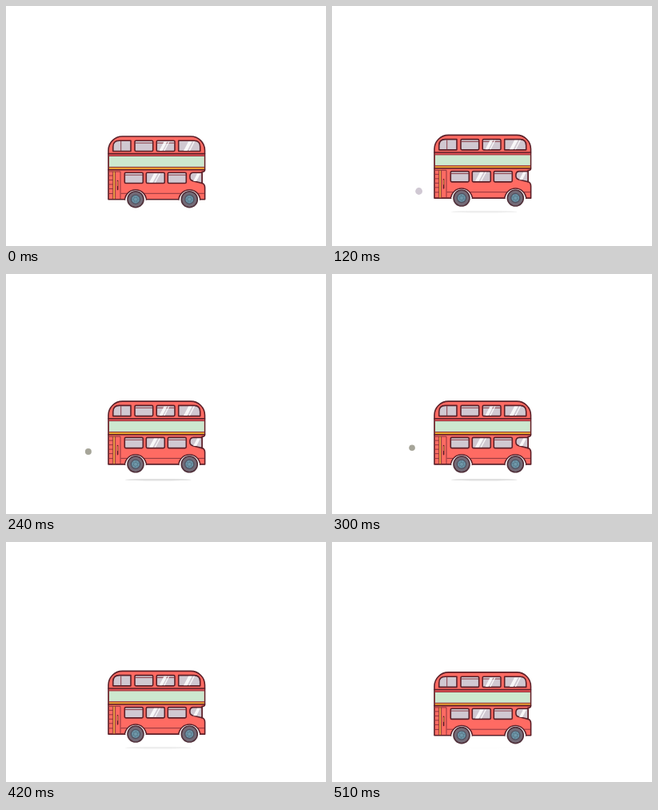
These frames come from a looping animation (400 by 300 pixels, 540 ms). An HTML page:

```html
<!DOCTYPE html>
<html lang="en">
<head>
<meta charset="utf-8">
<title>Bouncing bus</title>
<style>
  html, body { margin: 0; width: 100%; height: 100%; overflow: hidden; background: #fff; }
  svg { display: block; width: 400px; height: 300px; }
  .ink { stroke: #5c2029; stroke-width: 1.6; stroke-linejoin: round; stroke-linecap: round; }
  .thin { stroke: #83303a; stroke-width: .9; fill: none; }
  .red { fill: #ff6b63; }
  .glass { fill: #d0c8d1; }
  .glare { fill: #fff; opacity: .85; }
</style>
</head>
<body>
<svg viewBox="0 0 400 300">
  <defs>
    <g id="wheel">
      <circle r="10" fill="#746b77" stroke="#50303a" stroke-width="1.6"/>
      <circle r="5.6" fill="#6a93a6" stroke="#50505f" stroke-width="1.2"/>
      <g class="spokes" stroke="#54707f" stroke-width=".6" fill="none">
        <path d="M-4.5 0H4.5M-2.3-3.9L2.3 3.9M2.3-3.9L-2.3 3.9"/>
        <circle r="2.4" fill="#7199ab"/>
      </g>
    </g>
  </defs>
  <ellipse id="shadow" cx="190.2" cy="257.2" rx="41.5" ry="1.3" fill="#e0e0e0"/>
  <circle id="puff"/>
  <g id="bus">
    <path class="ink red" d="M128 241.8V180.5A17.5 17.5 0 0 1 145.5 163H231A17.5 17.5 0 0 1 248.5 180.5V205Q248.5 207.3 245 207.3V221.5Q248.6 222.5 248.6 227V241.8Z"/>
    <path fill="#e95156" d="M129 185H247.7V187.5H129Z"/>
    <path fill="#cce8cf" d="M129 188H247.7V201H129Z"/>
    <path d="M129 202.8H247.7" stroke="#e9a72c" stroke-width="2"/>
    <path class="ink" fill="none" d="M128 184.6H248.5M128 204.7H248.5"/>
    <path class="thin" d="M128 187.5H248.5M128 201.4H248.5"/>
    <g id="windows"></g>
    <path class="thin" d="M143.7 169V181M161.5 171.2H183M188.5 171.2H211M148.5 211.2H171M202.5 211.2H225"/>
    <path class="glare" d="M197.5 169.5H201.5L195.5 181H191.5ZM203 169.5H204.5L198.5 181H197ZM228 169.5H232.5L226.5 181H222ZM234.5 169.5H236L230 181H228.5ZM185 209.5H189.5L183.5 220.5H179ZM191.5 209.5H193L187 220.5H185.5ZM239 209.5H243L238 219H234Z"/>
    <path fill="#f3a044" d="M133.7 206H136.6V241H133.7Z"/>
    <path class="thin" d="M128 207H143V241M133.7 207V241M136.6 207V241M143.5 234.3H248M128 212H133.7M128 217.5H133.7M128 223H133.7M128 228.5H133.7M128 234.5H133.7"/>
    <path class="ink" d="M139.6 218.5V229.5" stroke-width="2"/>
    <path d="M139.6 219V225" stroke="#e8a448" stroke-width=".8"/>
    <g class="ink" fill="#fff">
      <path d="M148.6 241.8A13.5 13.8 0 0 1 175.4 241.8"/>
      <path d="M215.9 241.8A13.5 13.8 0 0 1 242.7 241.8"/>
    </g>
    <path d="M149.5 242H174.5M216.8 242H241.8" stroke="#fff" stroke-width="2.6"/>
    <use href="#wheel" x="162" y="241.7"/>
    <use href="#wheel" x="229.3" y="241.7"/>
  </g>
</svg>
<script>
  const LOOP = 540, STEP = 30;
  const $ = id => document.getElementById(id);
  const set = (el, attrs) => Object.entries(attrs).forEach(([k, v]) => el.setAttribute(k, v));

  const pane = (x, y, w, h) =>
    `<rect class="ink glass" x="${x}" y="${y}" width="${w}" height="${h}" rx="1.5"/>`;
  $('windows').innerHTML =
    '<path class="ink glass" d="M133.8 181.5V176Q133.8 168.3 141.5 168.3H156V181.5Z"/>' +
    '<path class="ink glass" d="M215.7 181.5V168.3H235Q242.7 168.3 242.7 176V181.5Z"/>' +
    '<path class="ink glass" d="M245 208.3H233.5Q229.8 208.8 229.8 213.5Q229.8 218 233.5 218.6L245 221.5Z"/>' +
    pane(161, 168.3, 22.7, 13.2) + pane(188.2, 168.3, 22.8, 13.2) +
    [148.3, 175.3, 202.3].map(x => pane(x, 208.3, 23, 13.2)).join('');

  const spokes = document.querySelector('.spokes');

  function draw(now) {
    const t = Math.floor(now % LOOP / STEP) * STEP;
    const lift = Math.sin(Math.PI * t / LOOP) ** 2;
    set($('bus'), { transform: `translate(0 ${-4 * lift})` });
    set($('shadow'), { opacity: Math.min(1, lift * 1.3) });
    set(spokes, { transform: `rotate(${t / LOOP * 360})` });

    // The exhaust puff drifts up and back, blinking once on the way.
    const drift = (t - 120) / 120;
    const visible = t >= 30 && t <= 300 && t !== 180;
    set($('puff'), {
      cx: 108.6 - 5.7 * drift,
      cy: 231.5 - 9.5 * drift,
      r: 4.4 - .4 * drift,
      fill: t < 180 ? '#d0c8d3' : '#a6a599',
      opacity: visible ? 1 : 0
    });
  }

  const start = performance.now();
  function tick() {
    draw(performance.now() - start);
    requestAnimationFrame(tick);
  }
  tick();
</script>
</body>
</html>
```
